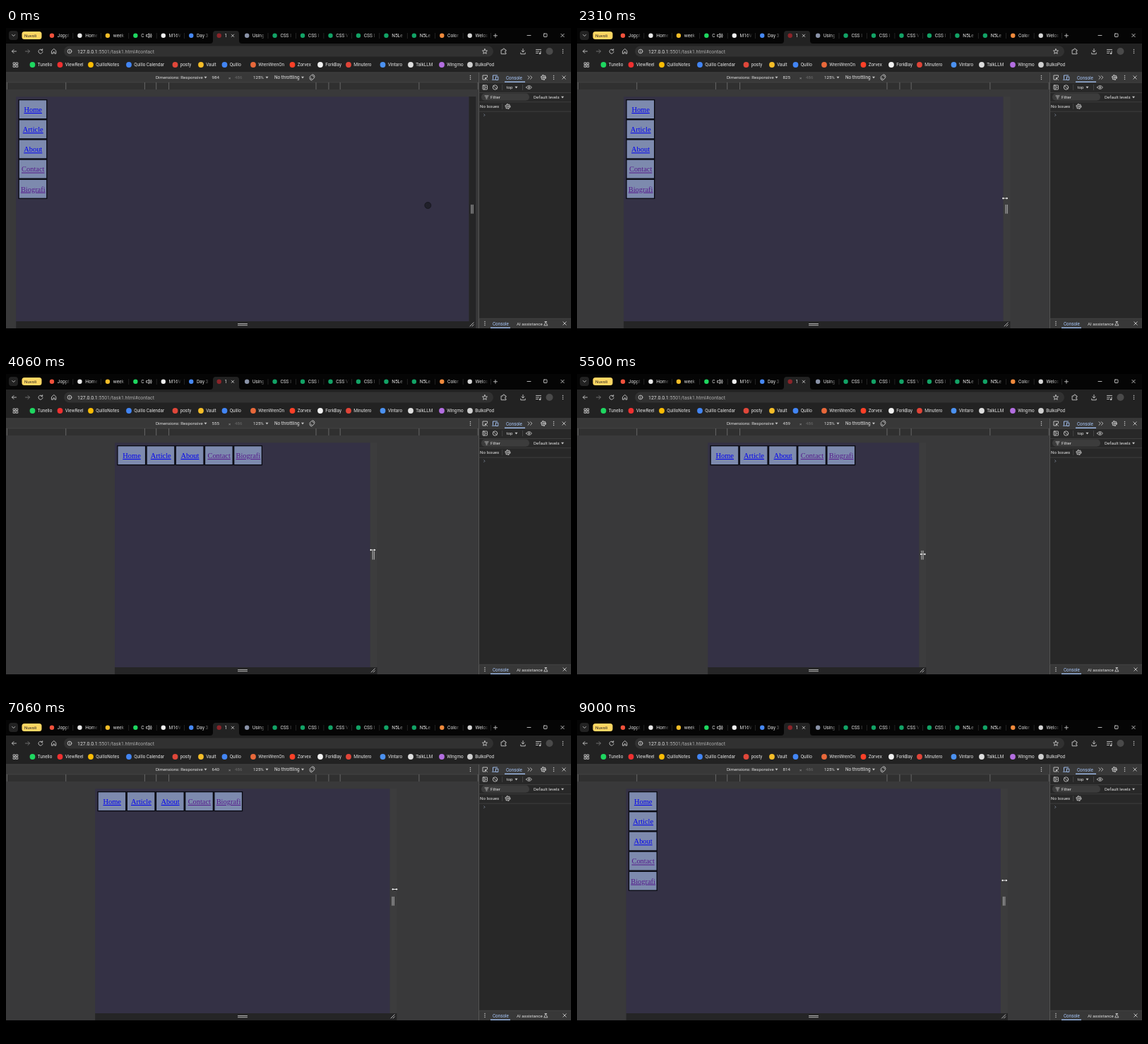
Recreate the animation shown at these times as an HTML page. Size 800x450 px, loop 9.06 s.

```html
<!DOCTYPE html>
<html lang="en">
<head>
<meta charset="utf-8">
<title>Responsive menu</title>
<style>
  html, body { margin: 0; width: 100%; height: 100%; overflow: hidden; background: #000; }
  svg { display: block; width: 100vw; height: 100vh; }
  text { font: 6.15px Roboto, sans-serif; fill: #e3e3e3; white-space: pre; }
  .link { font: 10.42px "Liberation Serif", serif; text-anchor: middle; text-decoration: underline; }
  .line { fill: none; stroke: #c7c7c7; stroke-width: .9; stroke-linecap: round; stroke-linejoin: round; }
</style>
</head>
<body>
<svg id="stage" viewBox="0 0 800 450"></svg>
<script>
const stage = document.getElementById('stage');
const rect = (x, y, w, h, fill, rx = 0, extra = '') =>
  `<rect x="${x}" y="${y}" width="${w}" height="${h}" fill="${fill}" rx="${rx}" ${extra}/>`;
const dot = (x, y, r, fill) => `<circle cx="${x}" cy="${y}" r="${r}" fill="${fill}"/>`;
const ring = (x, y, r) => `<circle cx="${x}" cy="${y}" r="${r}" class="line"/>`;
const line = (d, style = '') => `<path d="${d}" class="line" style="${style}"/>`;
const label = (x, y, s, style = '') => `<text x="${x}" y="${y}" style="${style}">${s}</text>`;
const caret = (x, y) => `<path d="M${x - 2} ${y - 1.2}h4l-2 2.8z" fill="#c7c7c7"/>`;
const kebab = (x, y) => [-2.5, 0, 2.5].map(d => dot(x, y + d, .75, '#c7c7c7')).join('');
const cross = (x, y, r = 2.2) => line(`M${x - r} ${y - r}l${2 * r} ${2 * r}m0 ${-2 * r}l${-2 * r} ${2 * r}`);
const gear = (x, y) => ring(x, y, 1.2) + ring(x, y, 2.9) +
  `<circle cx="${x}" cy="${y}" r="3.6" class="line" stroke-dasharray="1.2 2.57"/>`;
const BAR = '#383838', PANEL = '#282828', STRIP = '#050505', TOOLBAR = '#222';

function tabStrip() {
  const tabs = [
    ['Joppt', '#f0523c'], ['Home', '#e8e8e8'], ['week', '#f5bd28'], ['C', '#1ed760'], ['M16V', '#f0f0f0'],
    ['Day 3', '#4688f4'], ['1', '#8c2429'], ['Using', '#8a93a8'], ['CSS I', '#12a366'], ['CSS I', '#12a366'],
    ['CSS V', '#12a366'], ['CSS I', '#12a366'], ['N5Le', '#12a366'], ['N5Le', '#12a366'], ['Color', '#f08a3c'], ['Welco', '#d5d5d5']
  ];
  const active = 6;
  let out = `<linearGradient id="fade"><stop stop-color="${STRIP}" stop-opacity="0"/><stop offset=".7" stop-color="${STRIP}"/></linearGradient>` +
    rect(0, 0, 800, 22, STRIP) + rect(4, 4, 13, 13, TOOLBAR, 4) +
    line('M8.7 9.5l2 2 2-2') + rect(22.5, 5, 28, 11, '#fdd663', 3.5) +
    label(26, 12.7, 'Nuvoli', 'fill:#222') +
    `<path d="M289 22q4 0 4-4V8q0-4 4-4h29q4 0 4 4v10q0 4 4 4z" fill="${TOOLBAR}"/>`;
  tabs.forEach(([title, color], i) => {
    const x = 65 + i * 39.45;
    out += dot(x, 10.8, 3.2, color) + label(x + 7.8, 13, title, 'font-size:6.6px');
    if (title.length > 1) out += rect(x + 17.5, 5, 12, 11, 'url(#fade)');
    if (i !== active && i !== active - 1) out += rect(x + 29.5, 7, .7, 8, '#303030');
  });
  return out + cross(321, 10.8, 1.7) +
    line('M199 9.5h1.5l2-1.7v6l-2-1.7h-1.5zM204 9q1.4 1.8 0 3.6M205.3 8q2 2.8 0 5.6') +
    line('M690.5 10.8h5M693 8.3v5M738 10.5h5') +
    rect(761.5, 8, 4.5, 4.5, 'none', .5, 'class="line"') + cross(788, 10.5);
}

function addressBar() {
  return rect(0, 22, 800, 41, TOOLBAR) + rect(82, 25.5, 608, 15, '#313131', 7.5) +
    line('M14.5 33h-6m2.5-2.5L8.5 33l2.5 2.5') +
    line('M27.5 33h6m-2.5-2.5l2.5 2.5-2.5 2.5', 'stroke:#777') +
    line('M51.3 31.2A3 3 0 1 0 52 33.5M51.7 29.7v2h-2') +
    line('M64.8 32.2l3-2.7 3 2.7v4h-2v-2.3h-2v2.3h-2z') +
    ring(90, 33, 2.9) + line('M90 32.7v1.7M90 31.3v.1') +
    label(101, 35.6, '127.0.0.1<tspan fill="#aaa">:5501/task1.html#contact</tspan>', 'font-size:6.92px') +
    line('M678 29.6l1 2.3 2.5.2-1.9 1.7.6 2.5-2.2-1.3-2.2 1.3.6-2.5-1.9-1.7 2.5-.2z') +
    line('M701.5 31h2q0-2 1.4-2t1.4 2h1.7v1.8q-1.5 0-1.5 1.2t1.5 1.2v1.5h-6.5z') +
    line('M732 29.5v4.5m-2-2l2 2 2-2M728.8 35v1.8h6.4V35') +
    line('M750.5 30.5h7M750.5 33h4M750.5 35.5h3M757 32.5v3.5') + dot(756, 36, 1.2, '#c7c7c7') +
    dot(769.5, 33, 5, '#4a4a4a') + kebab(788.5, 33);
}

function bookmarks() {
  const items = [
    [37.5, 'Tunelio', '#1ed760'], [76.5, 'ViewReel', '#f03030'], [120, 'QuilloNotes', '#fbbc04'],
    [174, 'Quillo Calendar', '#4285f4'], [239.5, 'posty', '#e0473a'], [276, 'Vault', '#f5bd28'],
    [309.5, 'Quillo', '#4285f4'], [350, 'WrenWrenOn', '#e8683a'], [405.5, 'Zorvex', '#fc4028'],
    [445, 'ForkBay', '#f0f0f0'], [485, 'Minutero', '#e04438'], [533.5, 'Vintaro', '#4b91f0'],
    [573, 'TalkLLM', '#dedede'], [617, 'Wingmo', '#b36ee0'], [657, 'BulkoPod', '#cfcfcf']
  ];
  let out = '';
  for (const x of [10.5, 14.3]) for (const y of [49, 52.8]) out += rect(x, y, 2.5, 2.5, 'none', 0, 'class="line"');
  for (const [x, name, color] of items) out += dot(x, 52, 3.9, color) + label(x + 7.2, 54.3, name, 'font-size:6.35px');
  return out;
}

function deviceBar() {
  let out = rect(0, 63, 669, 14, BAR) + rect(0, 77, 669, 10, '#303030') +
    rect(0, 87, 669, 338, '#39393a') + rect(0, 62.5, 800, .7, '#4a4a4a') + rect(0, 76.7, 669, .6, '#4a4a4a') +
    label(212, 72.2, 'Dimensions: Responsive') + caret(282.5, 70) +
    label(315, 72.5, '×', 'fill:#999') + label(324, 72.2, '486', 'fill:#6c6c6c') +
    label(350, 72.2, '125%') + caret(369.5, 70) +
    label(380, 72.2, 'No throttling', 'font-size:6.4px') + caret(420, 70) +
    '<rect x="431" y="67.8" width="5" height="4.2" class="line" transform="rotate(45 433.5 69.9)"/>' +
    line('M429.8 71q.5 3 3.2 3.2M437.2 68.8q-.5-3-3.2-3.2') + kebab(657.5, 70);
  for (const width of [320, 375, 425, 768, 1024])
    for (const side of [-1, 1]) out += rect(334.3 + side * width * .3256, 77, 1, 10, '#666');
  return out;
}

function devTools() {
  const accent = '#a8c7fa';
  return rect(669, 63, 131, 362, PANEL) + rect(669, 63, 131, 14, BAR) + rect(669, 411, 131, 14, BAR) +
    rect(669, 63, .8, 362, '#5e5e5e') +
    [77, 91, 104.5, 117.8, 410.8].map(y => rect(669, y, 131, .6, '#4a4a4a')).join('') +
    line('M679 73h-4v-6h6.5v2.5M681.5 73.5l-3-3h2.2m-2.2 0v2.2') +
    line('M689.5 72v-5h6M688.5 73.2h4M693.8 69h3v4.5h-3z', 'stroke:' + accent) +
    label(708, 72.7, 'Console', 'font-size:6.3px;fill:' + accent) + rect(706, 75.6, 29, 1.3, accent) +
    line('M739 67.7l2.3 2.3-2.3 2.3M742.5 67.7l2.3 2.3-2.3 2.3') + gear(761, 70) + kebab(775.5, 70) + cross(790, 70) +
    rect(675, 81, 6.5, 6, 'none', .6, 'class="line"') + line('M677 81v6M678.5 82.8l1.6 1.2-1.6 1.2') +
    ring(692.5, 84, 3.2) + line('M690.3 81.8l4.4 4.4') + rect(702.5, 80, .6, 8, '#555') +
    label(708.5, 86.2, 'top') + caret(722.5, 84) + rect(731, 80, .6, 8, '#555') +
    line('M736.5 84q4-5 8 0q-4 5-8 0z') + ring(740.5, 84, 1.1) +
    rect(673, 92.6, 68, 10.2, '#3c3c3c', 5.1) + line('M678 96h5M679.2 98h2.6M680 100h1') +
    label(686, 100, 'Filter') + label(747, 100, 'Default levels') + caret(788, 98) +
    label(671, 113.2, 'No Issues') + rect(702.5, 107, .6, 8, '#555') + gear(710.5, 111) +
    line('M676.7 121.8l1.4 1.4-1.4 1.4', 'stroke:#8f9bb0;stroke-width:.7') +
    kebab(678, 418) + label(689, 420.6, 'Console', 'font-size:6.3px;fill:' + accent) + rect(686, 423.6, 28, 1.3, accent) +
    label(723, 420.6, 'AI assistance') + line('M763 415.5h2.6M763.6 415.5v2l-1.9 3.4h5.2l-1.9-3.4v-2') + cross(791, 418);
}

const menu = ['Home', 'Article', 'About', 'Contact', 'Biografi'];
stage.innerHTML = tabStrip() + addressBar() + bookmarks() + deviceBar() +
  '<text id="width" x="291.5" y="72.2"></text>' +
  rect(0, 415, 0, 10, '#252526', 0, 'id="bottomBar"') + rect(0, 97, 10, 318, '#252526', 0, 'id="sideBar"') +
  rect(0, 97.3, 0, 317.7, '#343145', 0, 'id="page"') +
  '<g id="menu">' + menu.map((name, i) => '<g>' +
    rect(.65, .65, 39.7, 27, '#7d8aae', 0, 'stroke="#080910" stroke-width="1.3"') +
    `<text class="link" x="20.8" y="18" style="fill:${i < 3 ? '#0000ee' : '#551a8b'}">${name}</text></g>`).join('') + '</g>' +
  line('M328.5 418.5h13M328.5 420.7h13') +
  '<g id="grips">' + line('M3.6 250.3v12M5.8 250.3v12') + line('M1.6 422l5.2-5.2M4.6 422l2.2-2.2') + '</g>' +
  '<circle id="touch" r="4.5" fill="#20202a" stroke="#15151c" stroke-width=".8"/>' +
  '<path id="arrow" d="M-4.3 0l2.2-1.8v1.3h4.2v-1.3L4.3 0 2.1 1.8V.5h-4.2v1.3z" fill="#fff" stroke="#000" stroke-width=".6" paint-order="stroke"/>' +
  devTools();

// time, viewport width, pointer offset from the page's right edge, pointer y
const poses = [
  [0, 984, -58, 251], [250, 984, -58, 251], [850, 984, 3.5, 252], [1250, 984, 3.5, 252], [1500, 962, 3, 249],
  [1940, 885, 3, 245], [2310, 825, 2.6, 241], [2870, 704, 2.6, 243], [3400, 630, 3, 246], [4060, 555, 3.7, 249],
  [4650, 490, 4.5, 252], [5150, 459, 5.5, 255], [5650, 459, 5.5, 255], [6000, 494, 6.5, 252], [6370, 544, 7.5, 247.5],
  [6620, 576, 7.3, 245], [7100, 646, 7, 239], [7560, 712, 6.8, 234], [7750, 734, 6.8, 233], [8100, 777, 6, 230],
  [8450, 814, 5.3, 227], [9060, 814, 5.3, 227]
];
const SCALE = .6515, CENTER = 334.8, LOOP = 9060, BREAKPOINT = 768;
const el = id => document.getElementById(id);
const move = (node, x, y) => node.setAttribute('transform', `translate(${x} ${y})`);

function poseAt(t) {
  const i = poses.findIndex(p => p[0] > t);
  const a = poses[i - 1], b = poses[i], k = (t - a[0]) / (b[0] - a[0]);
  return a.slice(1).map((v, j) => v + (b[j + 1] - v) * k);
}

function draw(t) {
  const [width, offset, pointerY] = poseAt(t);
  const shown = width * SCALE, left = CENTER - shown / 2, right = left + shown;
  el('width').textContent = Math.round(width);
  for (const [id, x, w] of [['page', left, shown], ['bottomBar', left, shown + 10], ['sideBar', right, 10]]) {
    el(id).setAttribute('x', x);
    el(id).setAttribute('width', w);
  }
  const column = width > BREAKPOINT;
  move(el('menu'), left + 3.2, 101);
  [...el('menu').children].forEach((item, i) => move(item, column ? 0 : i * 41.2, column ? i * 28.15 : 0));
  move(el('grips'), right, 0);
  const touching = offset < 0;
  el('touch').style.display = touching ? '' : 'none';
  el('arrow').style.display = touching ? 'none' : '';
  el('sideBar').setAttribute('fill', touching ? '#252526' : '#3c3c3d');
  move(el(touching ? 'touch' : 'arrow'), right + offset, pointerY);
}

function frame() {
  draw(performance.now() % LOOP);
  requestAnimationFrame(frame);
}
frame();
</script>
</body>
</html>
```
